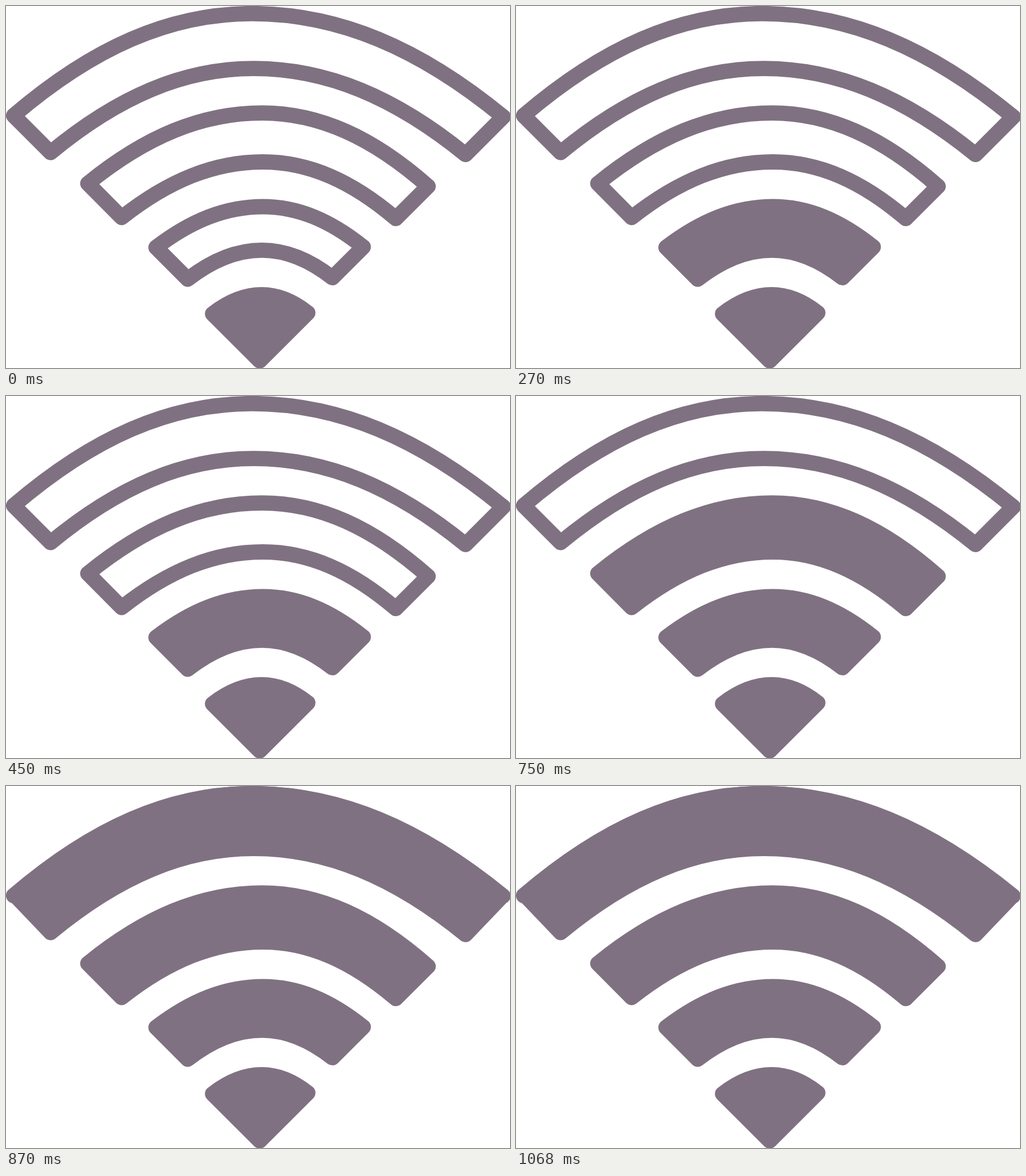
An HTML page with a canvas for the animation above (1.2 s loop, 882 by 635 pixels).

```html
<!DOCTYPE html>
<html lang="en">
<head>
<meta charset="utf-8">
<title>Signal strength</title>
<style>
  html, body { margin: 0; width: 100%; height: 100%; overflow: hidden; background: #fff; }
  canvas { display: block; }
</style>
</head>
<body>
<canvas id="stage" width="882" height="635"></canvas>
<script>
const ctx = document.getElementById('stage').getContext('2d');
const LOOP = 1200;
const INK = '#807182';
const FLAT = 0.345; // length of the level handle at a crest, as a share of the half width

// Corners are [x, y]; top and low are the crests of the two curves.
const bands = [
  { left: [262.5, 423.5], right: [625.2, 422.7], lowRight: [571.2, 476.7], lowLeft: [318, 479.3],
    top: [449.5, 352], low: [448, 428.3], fillAt: 270 },
  { left: [143.2, 311.3], right: [738.7, 316.3], lowRight: [682.2, 372.8], lowLeft: [202.4, 371.1],
    top: [448, 187.6], low: [449.5, 273.5], fillAt: 570 },
  { left: [13.3, 192.2], right: [870.2, 194.4], lowRight: [804.2, 260.6], lowLeft: [78, 257.1],
    top: [430.5, 13.3], low: [433.5, 109.7], fillAt: 870, notched: true }
];

const mix = (a, b, k) => a + (b - a) * k;

// Two rounded halves that meet level at the crest.
function arch(from, crest, to) {
  const [cx, cy] = crest;
  ctx.bezierCurveTo(mix(from[0], cx, 1 / 3), mix(from[1], cy, 2 / 3),
    mix(cx, from[0], FLAT), cy, cx, cy);
  ctx.bezierCurveTo(mix(cx, to[0], FLAT), cy,
    mix(to[0], cx, 1 / 3), mix(to[1], cy, 2 / 3), to[0], to[1]);
}

function drawBand(b, filled) {
  ctx.beginPath();
  ctx.moveTo(...b.left);
  arch(b.left, b.top, b.right);
  ctx.lineTo(...b.lowRight);
  arch(b.lowRight, b.low, b.lowLeft);
  ctx.closePath();
  ctx.stroke();
  if (filled) ctx.fill();
}

// The filled outer band has sides set slightly inside its rounded tips.
function drawNotched(b) {
  const left = [b.left[0] + 3, b.left[1]];
  const right = [b.right[0] - 3, b.right[1]];
  drawBand({ ...b, left, right }, true);
  const tip = [b.right[0] - 0.5, b.right[1] - 1.5];
  ctx.beginPath();
  ctx.moveTo(...b.left);
  arch(b.left, b.top, tip);
  ctx.stroke();
}

function drawDot() {
  const left = [361.5, 540], right = [528.2, 538.2];
  ctx.beginPath();
  ctx.moveTo(...left);
  arch(left, [447.5, 506.5], right);
  ctx.lineTo(444, 622.4);
  ctx.closePath();
  ctx.stroke();
  ctx.fill();
}

function draw(t) {
  ctx.fillStyle = '#fff';
  ctx.fillRect(0, 0, 882, 635);
  ctx.fillStyle = ctx.strokeStyle = INK;
  ctx.lineWidth = 26.8;
  ctx.lineJoin = ctx.lineCap = 'round';
  drawDot();
  for (const b of bands) {
    const filled = t >= b.fillAt;
    if (filled && b.notched) drawNotched(b);
    else drawBand(b, filled);
  }
}

const start = performance.now();
function tick() {
  draw((performance.now() - start) % LOOP);
  requestAnimationFrame(tick);
}
tick();
</script>
</body>
</html>
```
